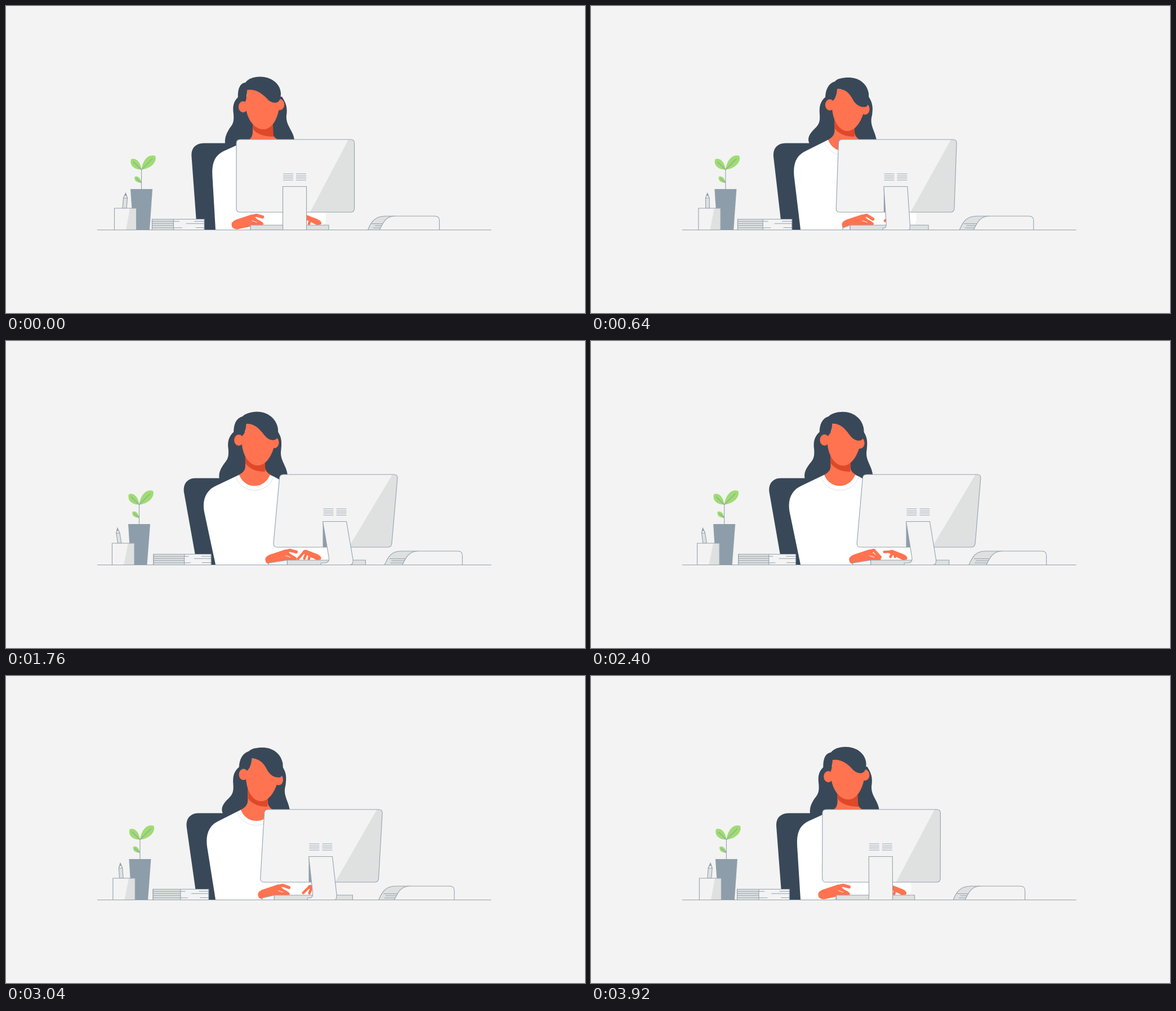
Recreate the animation shown at these times as an HTML page. Size 1028 px wide and 545 px high, loop 4 s.

```html
<!DOCTYPE html>
<html lang="en">
<head>
<meta charset="utf-8">
<title>At the desk</title>
<style>
  html, body { margin: 0; height: 100%; overflow: hidden; background: #f3f3f3; }
  svg { display: block; width: 100%; height: 100%; }
  .line { stroke: #93a1ae; stroke-width: 1.1; fill: none; }
  .paper { fill: #f3f3f3; }
  .shade { fill: #dfe1e0; }
  .slate { fill: #8e9daa; }
  .dark { fill: #394858; }
  .skin { fill: #ff7350; }
  .finger { fill: none; stroke: #ff7350; stroke-linecap: round; stroke-linejoin: round; }
</style>
</head>
<body>
<svg id="stage" viewBox="0 0 1028 545"></svg>
<script>
const LOOP = 4000, STEP = 80;

// Numbers joined by "~" are poses along the camera turn:
// 2 = straight, 3 = parabola through 0, .4 and 1, 4 = straight segments.
const STOPS = [0, 0.4, 0.757, 1];

function pose(values, e) {
  const [a, b, c] = values;
  if (values.length === 2) return a + (b - a) * e;
  if (values.length === 3) {
    const slope = ((b - a) - 0.16 * (c - a)) / 0.24;
    return a + slope * e + (c - a - slope) * e * e;
  }
  const i = e < STOPS[1] ? 0 : e < STOPS[2] ? 1 : 2;
  const f = (e - STOPS[i]) / (STOPS[i + 1] - STOPS[i]);
  return values[i] + (values[i + 1] - values[i]) * f;
}

function ease(x) {
  const curve = (s, p, q) => 3 * (1 - s) ** 2 * s * p + 3 * (1 - s) * s * s * q + s ** 3;
  let lo = 0, hi = 1;
  for (let i = 0; i < 20; i++) {
    const mid = (lo + hi) / 2;
    if (curve(mid, 0.3, 0.42) < x) lo = mid; else hi = mid;
  }
  return curve(lo, 0.15, 0.85);
}

const path = (cls, d, extra = '') => `<path class="${cls}" d="${d}" ${extra}/>`;

const plant = path('slate', 'M221~217 325H260~256L255~250.5 397H226~221.5z') +
  '<g transform="translate(0~-4 0)">' +
  path('', 'M240.5 290.5C243 272 254 262 265 266C269 277 257 289 240.5 290.5C239 277 231 269 222 272C219 283 227 290 240.5 290.5zM240.5 314C239 305 234 301 228.5 303C227 310 232 314 240.5 314z', 'fill="#9fdc72"') +
  path('line', 'M240.5 325V290.5L260 271M240.5 290.5L226 276.5M240.5 314L231 305.5') + '</g>';

const cup = path('line shade', 'M207~198.5 359L208.5~196 341L212.5~198 332.5L215.5~202 341L214~205 359z') +
  path('line paper', 'M208.5~196 341L212.5~198 332.5L215.5~202 341z') +
  path('slate', 'M210.5~197 337L212.5~198 332.5L214~200 337z') +
  path('paper', 'M192.5~188.5 359H231.5~228V397.5H192.5~188.5z') +
  path('shade', 'M220~217 359H231.5~228V397.5H213~209z') +
  path('line', 'M192.5~188.5 359H231.5~228V397.5H192.5~188.5z');

const books = path('line paper', 'M259.5~262 378.5H352~364V397.5H259.5~262z') +
  path('line shade', 'M259.5~262 378.5H297.5~316.5V397.5H259.5~262z') +
  path('line', 'M259.5~262 382.3H308~324M259.5~262 386H297.5~316.5M259.5~262 389.8H297.5~316.5M259.5~262 393.7H313~328M334~347 382.3H352~364M320~334 386.3H352~364M337~348 393.5H352~364');

const chair = path('dark', 'M339 397L329.5~316 268C328~314 252 337~324 243.5 352~336 243.5H420V397z');

const backHair = path('dark', 'M413~417~405 161C404~407~396 169 402~405~393 178 404~406~395 192C405~407~396 205 403~405~394 210 397~398~388 217C391~388~381 227 388~383~377 234 389~388~379 245V250H512~507~500V238C510~504~498 220 496~494~486 212 498~499~488.5 194C500~501~490 180 497~500~490 172 490~493~483 161z');

const body = path('', 'M372 397L366.5~352 303C365~348 276~281 372~356 264 389~374 256.5L431~421~414 237.5H482~476~469C495 250 568~592 300 568~592 378Q568~592 389 558~582 389H434~499L434~466 394V397z', 'fill="#fff"') +
  path('', 'M425~415~408 241C435~426~419 273 478~471~464 273 488~482~475 241', 'fill="none" stroke="#e0e0e0"');

const neck = path('skin', 'M438~432.5~425 195V222C438~432~425 230 436~427~420 234 431~421~414 237.5C440~431~424 264 474~466~459 264 482~476~469 237C476~471~463 233 473~468~460 230 473~468~460 222V195z') +
  path('', 'M438~432.5~425 195V217C443~440~433 228 462~454~446 232 475~468~460 232L473~468~460 195z', 'fill="#df4829"');

const ear = (x, y) => `<ellipse class="skin" cx="${x}" cy="${y}" rx="8.2" ry="10"/>`;

const head = ear('486~486.5~476.5', '175~183~180.5') +
  path('skin', 'M428~437~427 148~147~147C428~436~427 158 427~434~424 164 425~428~418.5 170C425~426~417 200 441~440~431 219~222~221 457~455~447 219~222~221C472~471~463 219~222~221 484~484~476 201 487~489~480 168L470~475~465 150z') +
  path('dark', 'M428~437~427 149.3~147~147C443~452~442 146.5 455~460~450 156 462~466~458 163~168~166C468~472~464 170~177~174 474~480~471 172.5~180.5~177.5 480~488~478 171.5~179~175.5C486~493.5~483.5 170~176~173 488~493.5~484 164~168~166 488~493~483 155C487~490~480 137 470~475~464 125.5~127~125.5 451~457~446 125.5~127~125.5C440~446~435 125.5~127~125.5 430~437~425 129 425~433~420 136~134~134C415~422~409 137 411~416~404 148 412~416~404.5 164L422~429~418 170~168~170C427~434~424 164 428~437~427 156 428~437~427 149.3~147~147z') +
  ear('421~424~413.5', '179~175.5~176');

const keyboard = path('line paper', 'M434~499 389L434~466 394V397.5H434~499z') +
  path('line shade', 'M434~499 389H573~638V397.5H434~499z');

const screen = 'M415.5~492 237H612~688Q618.5~695 237 618.5~694.5 243.5L618.5~684.5 359Q618.5~684 366 612~677.5 366H415.5~481Q409~474 366 409~474.5 359L409~485 243.5Q409~485.5 237 415.5~492 237z';
const vents = [298, 301.7, 305.3, 309].map(y => `M492~563 ${y}H510~581M515~586 ${y}H533~604`).join('');

const monitor = path('paper', screen) +
  path('shade', 'M608~685.5 237H612~688Q618.5~695 237 618.5~694.5 243.5L618.5~684.5 359Q618.5~684 366 612~677.5 366H540~608z') +
  path('line', screen) + path('line', vents) +
  path('slate', 'M491.5~562 320.5V366H491.5~570z') +
  path('line paper', 'M491.5~562 320.5H533.5~604L533.5~615.5 388Q533.5~616.5 397.5 533.5~610 397.5H491.5~558L491.5~559 394H491.5~566Q491.5~573 393.5 491.5~573 386z');

const pouch = path('line shade', 'M642.5~672 397.5C648~678 383 655~684 373 674~701 373H690~731V397.5z') +
  path('line', 'M649~681 386.5H680~712M655~684 390H680~712M652~682 394H680~712') +
  path('line paper', 'M663~703.5 397.5C670~710 383 675~716 373 690~731 373H761~802Q769.5~810 373 769.5~810 381V397.5z');

function hands(tap) {
  const left = path('skin', 'M0 388C0 383 5 380 12 378L36 370L46 379Q54 382 57 387L54 390H40L10 396.5Q0 396 0 388z') +
    path('finger', `M34 374L44 371.5L55 ${374.5 + 9 * tap}`, 'stroke-width="5.5"') +
    path('', 'M36 381L45 384', 'stroke="#fff" stroke-width=".9"');
  const right = path('skin', 'M0 386Q0 381 -8 378L-26 371Q-32 370 -34 376L-20 383L-8 389Q0 389 0 386z') +
    path('finger', `M-30 374L-41 ${386.5 - 12 * tap}M-26 376L-30 ${386 - 3 * tap}M-20 379L-22 ${387 - 4 * tap}`, 'stroke-width="4.6"');
  return `<g transform="translate(400.5~445.5~448~460 0)">${left}</g>` +
    `<g transform="translate(560~563~571~560 0)">${right}</g>`;
}

const stage = document.getElementById('stage');
const behind = plant + cup + chair + books + backHair + body + neck + head;
const front = keyboard + monitor + pouch + path('line', 'M162 397.5H861.5');

function draw(now) {
  const t = Math.floor(now % LOOP / STEP) * STEP;
  const e = 1.05 * ease(1 - Math.abs(1 - t / (LOOP / 2)));
  const beat = Math.cos(2 * Math.PI * (t - 376) / (LOOP / 4));
  const tap = Math.min(1, Math.max(0, 0.5 + 0.75 * beat));
  stage.innerHTML = (behind + hands(tap) + front).replace(/-?[\d.]+(~-?[\d.]+)+/g,
    key => pose(key.split('~').map(Number), e).toFixed(2));
  requestAnimationFrame(draw);
}
requestAnimationFrame(draw);
</script>
</body>
</html>
```
